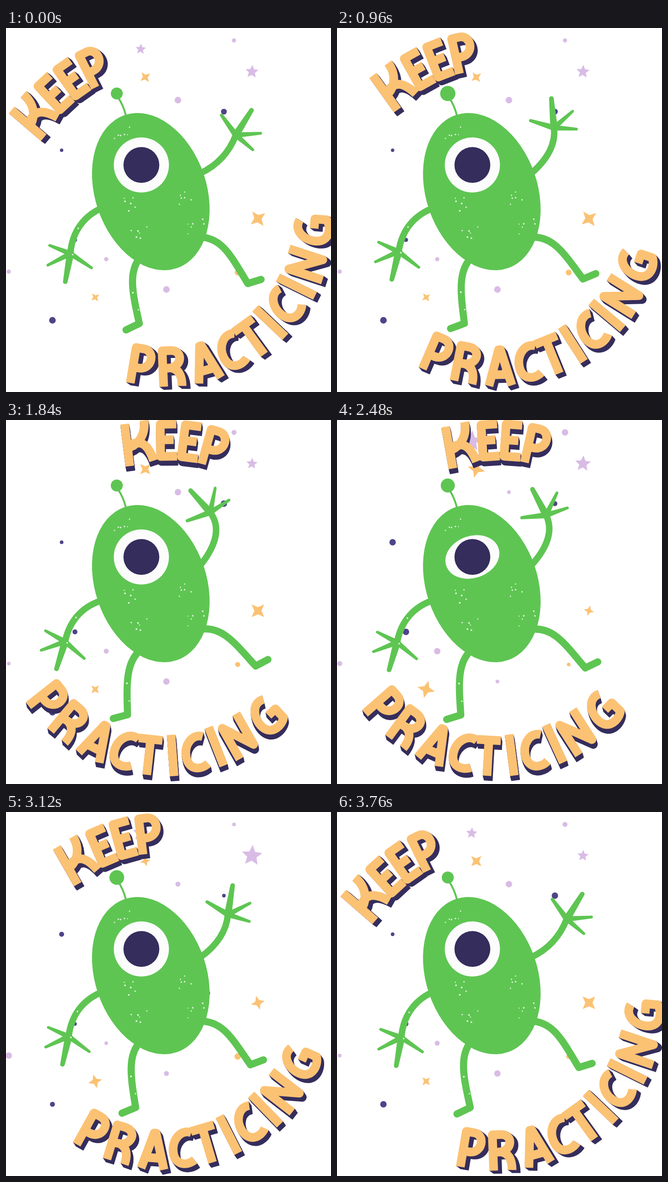
Write an HTML page with a canvas that moves like this. It is 707 px wide and 792 px high and loops after 3.84 s.

```html
<!DOCTYPE html>
<html lang="en">
<head>
<meta charset="utf-8">
<title>Keep practicing</title>
<style>
html, body { margin: 0; width: 100%; height: 100%; overflow: hidden; background: #fff; }
canvas { display: block; }
</style>
</head>
<body>
<canvas id="stage" width="707" height="792" role="img" aria-label="KEEP PRACTICING"></canvas>
<script>
const ctx = document.getElementById('stage').getContext('2d');
const GREEN = '#5ec552', NAVY = '#352d5c', ORANGE = '#fbc274', LILAC = '#d9bce6', INDIGO = '#4c4589';
const LOOP = 3840, STEP = 80, TWINKLE = 960;
const RAD = Math.PI / 180;
const sin2 = turns => Math.sin(Math.PI * turns) ** 2;
const mix = (a, b, k) => a + (b - a) * k;

function place(x, y, degrees, draw) {
  ctx.save();
  ctx.translate(x, y);
  ctx.rotate(degrees * RAD);
  draw();
  ctx.restore();
}

// Turns whatever is drawn, in stage coordinates, about a joint
const swing = (x, y, degrees, draw) => place(x, y, degrees, () => {
  ctx.translate(-x, -y);
  draw();
});

function oval(x, y, rx, ry, degrees, color) {
  ctx.beginPath();
  ctx.ellipse(x, y, rx, ry, degrees * RAD, 0, 2 * Math.PI);
  ctx.fillStyle = color;
  ctx.fill();
}
const disc = (x, y, r, color) => oval(x, y, r, r, 0, color);
const speck = (x, y, r) => disc(x, y, r, '#e4f6e0');

function line(path, width, color = GREEN) {
  ctx.lineWidth = width;
  ctx.strokeStyle = color;
  ctx.stroke(new Path2D(path));
}

function star(x, y, r, points, degrees, color) {
  const inner = points === 5 ? .46 : .4;
  place(x, y, degrees, () => {
    ctx.beginPath();
    for (let i = 0; i < points * 2; i++) {
      const a = i * Math.PI / points, d = i % 2 ? r * inner : r;
      ctx.lineTo(Math.sin(a) * d, -Math.cos(a) * d);
    }
    ctx.fillStyle = color;
    ctx.fill();
  });
}

// Every particle pulses alike; "x y sixth" gives its place and when, in sixths, it is smallest
const dot = color => (x, y, grow) => disc(x, y, mix(3.7, 7.2, grow), color);
const PARTICLES = [
  [dot(LILAC), '496 27 1, 374 157 3, 218 503 1, 6 530 5, 349 569 3'],
  [dot(INDIGO), '474 182 2, 121 266 0, 150 461 1, 101 636 3, 437 394 5'],
  [dot(ORANGE), '504 532 4'],
  [(x, y, grow) => star(x, y, mix(12, 24, grow), 5, 4, LILAC), '293 46 0, 535 95 5'],
  [(x, y, grow, p) => star(x, y, mix(11, 20, grow), 4, 90 * (p - .42), ORANGE),
    '303 107 1, 548 415 3, 194 586 0']
];

function particles(t) {
  const p = t / TWINKLE;
  for (const [draw, spots] of PARTICLES)
    for (const spot of spots.split(',')) {
      const [x, y, sixth] = spot.trim().split(' ').map(Number);
      draw(x, y, sin2(p - sixth / 6), p);
    }
}

// Hand-drawn glyphs, stroked around their own centre, and the room each takes
const GLYPHS = {
  K: ['M-25 46L-19 -46M24 -46C22 -16 4 2 -18 6M-12 0C14 -6 24 14 28 44', 80],
  E: ['M21 -35H-14V35H22M-14 -1H15', 50],
  P: ['M-17 44V-34H0C26 -34 26 8 -4 9H-16', 60],
  R: ['M-20 44V-34H-2C26 -34 24 3 -8 4H-16M-2 4C14 7 21 22 20 44', 74],
  A: ['M-25 44L-2 -34H2L25 44M-16 20H16', 70],
  C: ['M24 -31C2 -42 -20 -20 -20 6C-20 36 6 40 24 29', 52],
  T: ['M-26 -34H26M0 -34V44', 58],
  I: ['M-1 -45L1 45', 45],
  N: ['M-21 45V-32L21 32V-45', 60],
  G: ['M20 -30C-4 -42 -23 -16 -23 8C-23 40 10 40 25 29V3H4', 92]
};

// Sets a word along a circle from a leading angle; a negative radius sets it over the top
function arcText(word, cx, cy, radius, angle, color) {
  for (const letter of word) {
    const [path, room] = GLYPHS[letter], half = room / 2 / radius / RAD;
    angle -= half;
    place(cx, cy, angle, () => {
      ctx.translate(0, radius);
      line(path, 19, color);
    });
    angle -= half;
  }
}

function lettering(t) {
  const half = LOOP / 2, ease = k => sin2(k ** 1.37 / 2);
  const swept = t < half ? ease(t / half) : 1 - ease(t / half - 1);
  ctx.lineCap = 'butt';
  ctx.lineJoin = 'round';
  swing(354, 411, 42.7 * swept, () => {
    for (let depth = 1; depth >= 0; depth -= .125) {
      const dx = 9 * depth, dy = 6.5 * depth, color = depth ? NAVY : ORANGE;
      arcText('KEEP', 354 + dx, 411 + dy, -367, -59.4, color);
      arcText('PRACTICING', 347 + dx, 415 + dy, 321, 14.8, color);
    }
  });
}

// Fingers taper from the palm at the current origin: [x, y, tip width]
function hand(fingers) {
  disc(0, 0, 8, GREEN);
  for (const [x, y, w] of fingers) {
    const d = Math.hypot(x, y) / 3, nx = y / d, ny = -x / d;
    const shape = `M${nx} ${ny}L${x} ${y}L${-nx} ${-ny}Z`;
    line(shape, w);
    ctx.fill(new Path2D(shape));
  }
}

function limbs(e) {
  ctx.lineCap = 'round';
  swing(203, 396, 7.3 * e, () => {
    line('M212 390C172 407 144 440 140 491', 14);
    place(140, 491, 0, () => hand([[-45, -18, 6], [-49, 25, 6], [-11, 61, 10], [46, 31, 6]]));
    speck(157, 436, 1.8);
    speck(145, 493, 1.8);
  });
  swing(287, 505, 10.7 * e, () => {
    line('M293 498C264 530 276 580 290 643L261 657', 15.5);
    speck(276, 576, 2);
    speck(288, 613, 1.6);
  });
  swing(425, 455, -10.8 * e, () => line('M420 455C471 455 491 499 526 556L555 547', 15.5));

  const x = mix(500, 444, e), y = mix(233, 201, e);
  line(`M423 316Q478 ${mix(290, 246, e)} ${x} ${y}`, 14);
  place(x, y, -74.5 * e, () => hand([[34, -54, 10], [54, -4, 6], [37, 32, 6], [-31, -43, 7]]));
}

// Small pale specks scattered round a few spots of the skin
function skin() {
  let seed = 7;
  const random = () => (seed = seed * 16807 % 2147483647) / 2147483647;
  for (const [x, y] of [[256, 225], [264, 383], [290, 449], [388, 369], [413, 430]])
    for (let i = 0; i < 6; i++)
      speck(x + 40 * (random() - .5), y + 36 * (random() - .5), 1 + random());
}

function eye(t) {
  const lid = t > 2400 && t < 2880 ? 1 - .95 * sin2((t - 2400) / 480) : 1;
  ctx.save();
  oval(294.5, 298, 60, 60 * lid, -18.8, '#fcfcfc');
  ctx.clip();
  disc(294.5, 298, 39, NAVY);
  ctx.restore();
}

function draw(t) {
  ctx.fillStyle = '#fff';
  ctx.fillRect(0, 0, 707, 792);
  particles(t);
  lettering(t);
  limbs(sin2(t / LOOP));
  line('M243 150Q255 167 261 191', 4);
  disc(241, 142.5, 13 + 3.6 * sin2(2 * t / LOOP), GREEN);
  oval(315, 356, 121.2, 175.9, -18.8, GREEN);
  skin();
  eye(t);
}

function tick() {
  draw(Math.floor(performance.now() % LOOP / STEP) * STEP);
  requestAnimationFrame(tick);
}
tick();
</script>
</body>
</html>
```
